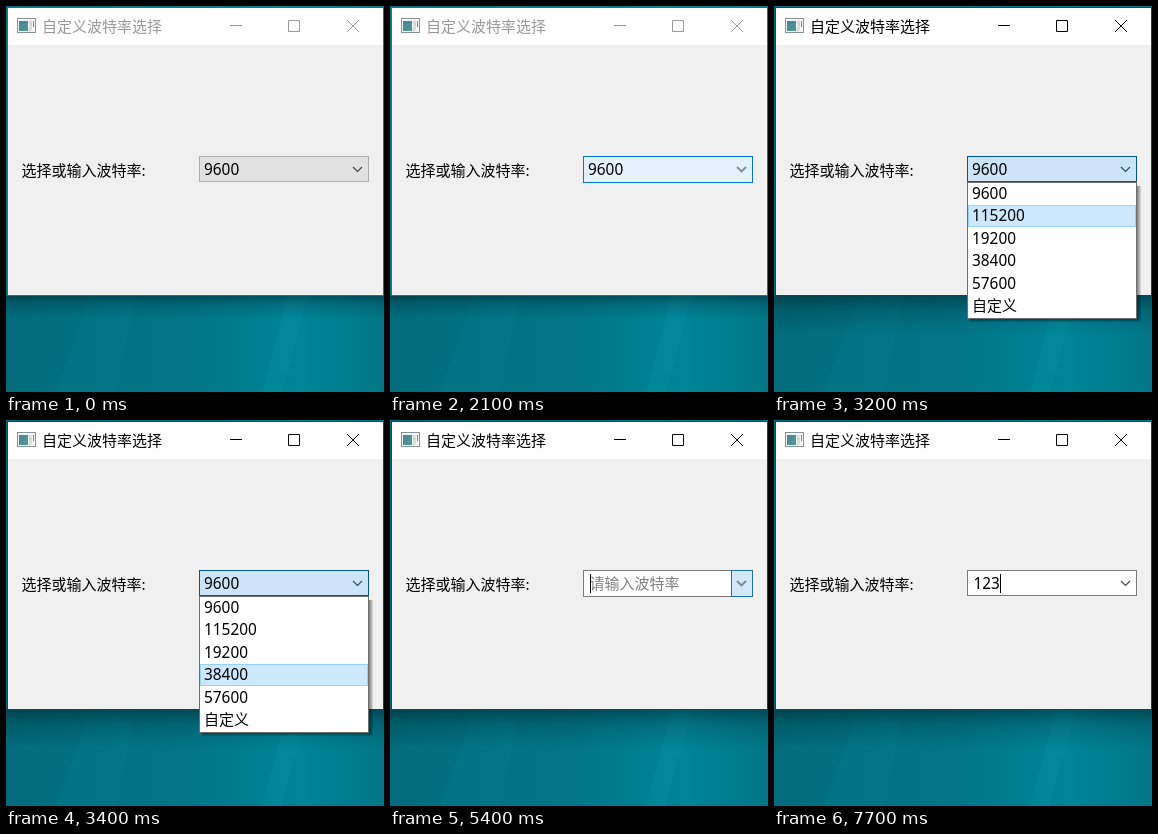
An HTML page that plays this animation: 378x386 px, repeating every 8 s.

```html
<!DOCTYPE html>
<html lang="zh-CN">
<head>
<meta charset="utf-8">
<style>
html, body { margin: 0; width: 378px; height: 386px; overflow: hidden; }
svg { display: block; }
text { font: 15px "Noto Sans CJK SC", "Noto Sans CJK", sans-serif; }
.num { font: 15.4px "Noto Sans", sans-serif; }
</style>
</head>
<body>
<svg id="stage" width="378" height="386">
  <defs>
    <linearGradient id="sea">
      <stop offset="0" stop-color="#006c7c"/>
      <stop offset=".5" stop-color="#007789"/>
      <stop offset=".78" stop-color="#008498"/>
      <stop offset="1" stop-color="#007789"/>
    </linearGradient>
    <linearGradient id="shade" x2="0" y2="1">
      <stop offset="0" stop-opacity=".38"/>
      <stop offset=".4" stop-opacity=".15"/>
      <stop offset="1" stop-opacity="0"/>
    </linearGradient>
    <linearGradient id="pane" x2="1" y2="1">
      <stop offset="0" stop-color="#4a80a0"/>
      <stop offset="1" stop-color="#4f9c88"/>
    </linearGradient>
    <clipPath id="drop"><rect x="190" y="176" width="180" height="145"/></clipPath>
  </defs>
  <rect width="378" height="386" fill="url(#sea)"/>
  <path d="M282 289H302L276 386H256Z" fill="#0a94a8" opacity=".25"/>
  <path d="M85 289H130L110 386H50Z" fill="#008296" opacity=".2"/>
  <rect id="shadow" y="289" width="378" fill="url(#shade)"/>
  <rect id="frame" x="1" y="1" width="377" height="289"/>
  <rect x="2" y="2" width="375" height="37" fill="#fff"/>
  <rect x="2" y="39" width="375" height="250" fill="#f0f0f0"/>
  <g id="icon">
    <rect x="11.5" y="12.5" width="18" height="14" fill="#f4f6f7" stroke="#83919b"/>
    <rect x="13" y="15" width="9" height="10" fill="url(#pane)"/>
    <rect x="23" y="15" width="3" height="10" fill="#d4dcdf"/>
    <rect x="27" y="15" width="1" height="6" fill="#5f9c83"/>
  </g>
  <g id="bar">
    <text x="36" y="26">自定义波特率选择</text>
    <path d="M224 19.5H236M282.5 14.5H293.5V25.5H282.5ZM341 14L353 26M353 14L341 26" fill="none"/>
  </g>
  <text x="15.5" y="170">选择或输入波特率:</text>
  <g id="field"></g>
  <g clip-path="url(#drop)"><g id="popup"></g></g>
</svg>
<script>
const $ = id => document.getElementById(id);
const options = ['9600', '115200', '19200', '38400', '57600', '自定义'];

// Each list holds [start time, value...]; the latest started entry counts.
const at = (list, t) => list.filter(k => k[0] <= t).pop().slice(1);

const comboKeys = [ // fill, border, arrow, height
  [0, '#e1e1e1', '#adadad', '#484848', 25],
  [1000, '#e3e9ee', '#5793c2', '#69747c', 26],
  [1100, '#e4f0fa', '#0078d7', '#7d8f9d', 26],
  [2100, '#e5f1fb', '#0078d7', '#7d8f9d', 26],
  [2200, '#e1eff9', '#0f7bcf', '#7d8f9d', 26],
  [2400, '#deedf8', '#2680c4', '#8295a3', 25],
  [2800, '#d5e8f7', '#1369b0', '#5f707c', 25],
  [3000, '#cce4f7', '#005499', '#3c4a55', 25]
];
const openKeys = [[0, 0], [2400, .35], [2500, .75], [2600, 1], [5400, 0]];
const rowKeys = [[0, 0], [3200, 1], [3300, 2], [3400, 3], [3600, 4], [3700, 5]];
const glowKeys = [[0, 1], [5500, .65], [5600, .3], [5700, 0]];
const caretKeys = [[0, 1], [5800, 0], [6300, 1], [6800, 0], [7200, 1]];
const typedKeys = [[0, ''], [7200, '1'], [7500, '12'], [7700, '123']];

const rect = (x, y, w, h, fill, more = '') =>
  `<rect x="${x}" y="${y}" width="${w}" height="${h}" fill="${fill}" ${more}/>`;
const box = (x, y, w, h, fill, line) => rect(x + .5, y + .5, w, h, fill, `stroke="${line}"`);
const label = (x, y, s, fill = '#000') =>
  `<text x="${x}" y="${y}" fill="${fill}" class="${/\d/.test(s) ? 'num' : ''}">${s}</text>`;
const arrow = (color, width = 1.2) =>
  `<path d="M347 161L351.5 165.5L356 161" fill="none" stroke="${color}" stroke-width="${width}"/>`;

function combo(t) {
  const [fill, line, tip, h] = at(comboKeys, t);
  const soft = t >= 1000 && t < 3000;
  return box(193, 150, 169, h, fill, line) + label(198, 169, '9600') + arrow(tip, soft ? 1.8 : 1.2);
}

function edit(t) {
  const [glow] = at(glowKeys, t), [caret] = at(caretKeys, t), [typed] = at(typedKeys, t);
  return box(193, 150, 169, glow ? 26 : 25, '#fff', '#7a7a7a') +
    `<g opacity="${glow}">${box(341, 150, 21, 26, '#d3e8f8', '#1a70b8')}</g>` +
    (glow ? arrow('#71889a', 1.8) : arrow('#484848')) +
    (typed ? label(199.5, 169, typed) : label(199.5, 169, '请输入波特率', '#808080')) +
    (caret ? rect(Math.floor(200 + 8.8 * typed.length), 154, 1, 19, '#000') : '');
}

function menu(t) {
  const [row] = at(rowKeys, t);
  let s = '';
  for (let i = 4; i > 0; i--) s += rect(196, 180, 167 + i, 132 + i, '#000', 'opacity=".13"');
  s += box(193, 176, 169, 136, '#fff', '#6e6e6e');
  const y = 177 + Math.round(22.4 * row);
  s += t < 3100 ? rect(194, y, 168, 22, '#cce8ff') : box(194, y, 167, 21, '#cce8ff', '#99d1ff');
  return s + options.map((o, i) => label(198, Math.round(192.75 + 22.5 * i), o)).join('');
}

function draw(t) {
  const active = t >= 2400, [open] = at(openKeys, t);
  const ink = active ? '#000' : '#999';
  $('bar').setAttribute('fill', ink);
  $('bar').setAttribute('stroke-width', 1);
  $('bar').lastElementChild.setAttribute('stroke', ink);
  $('frame').setAttribute('fill', active ? '#0b4a55' : '#2d6f7a');
  $('shadow').setAttribute('height', active ? 40 : 24);
  $('field').innerHTML = t < 5400 ? combo(t) : edit(t);
  $('popup').innerHTML = open ? menu(t) : '';
  $('popup').setAttribute('transform', `translate(0 ${Math.round((open - 1) * 140)})`);
}

function tick() {
  draw(performance.now() % 8000);
  requestAnimationFrame(tick);
}
tick();
</script>
</body>
</html>
```
